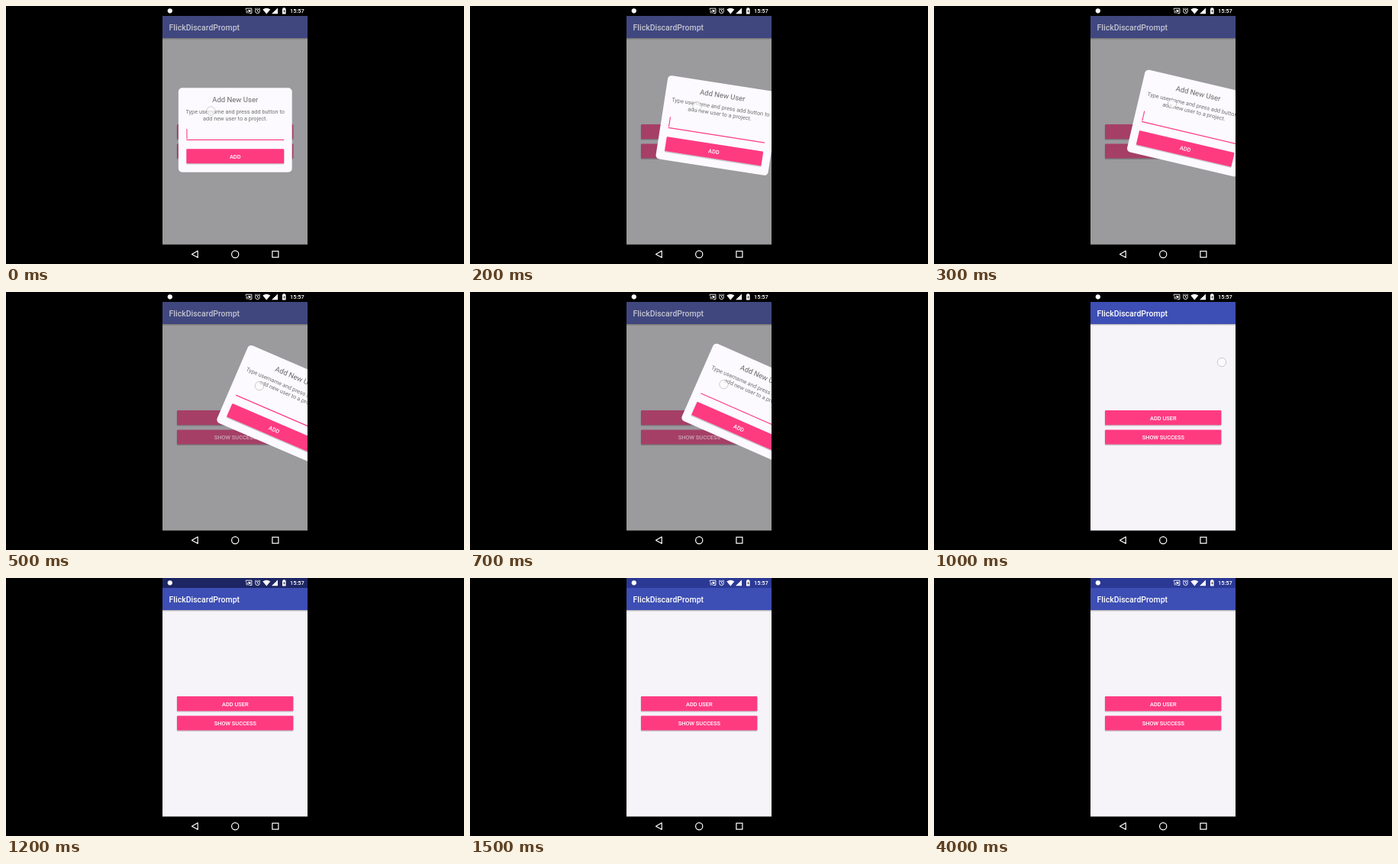
Animation, 600 px wide and 338 px high, one loop 4.1 s. Source, as an HTML page:

```html
<!DOCTYPE html>
<html lang="en">
<head>
<meta charset="utf-8">
<title>Swipe to dismiss</title>
<style>
  html, body { margin: 0; width: 100%; height: 100%; overflow: hidden; background: #000; }
  svg {
    display: block; width: 600px; height: 338px;
    font-family: Roboto, "Noto Sans", sans-serif;
    --page: #f6f4f8; --bar: #3d4eb4; --btn: #ff3b80; --label: #fff; --title: #fff;
  }
  svg.dim { --page: #9b9a9c; --bar: #40477f; --btn: #a53f65; --label: #cfaab7; --title: #c2c3cf; }
  .page { fill: var(--page); }
  .bar { fill: var(--bar); }
  .title { fill: var(--title); font-size: 10.5px; font-weight: 500; }
  .btn { fill: var(--btn); }
  .label { fill: var(--label); font-size: 7.4px; font-weight: 500; }
  .mid { text-anchor: middle; }
  .shade { fill: #000; opacity: .2; }
  .card { fill: #fcfafe; }
  .head { fill: #666; font-size: 9.5px; }
  .body { fill: #707070; font-size: 7.36px; }
  .pink { fill: #ff3b80; }
  .line { fill: none; stroke: #fff; }
  .finger { fill: #fff; fill-opacity: .6; stroke: #999; stroke-opacity: .55; stroke-width: .9; }
</style>
</head>
<body>
<svg id="stage" class="dim" viewBox="0 0 600 338">
  <defs>
    <clipPath id="screen"><rect x="205" y="13" width="190" height="299.5"/></clipPath>
    <linearGradient id="fall" x2="0" y2="1">
      <stop offset="0" stop-opacity=".28"/><stop offset="1" stop-opacity="0"/>
    </linearGradient>
  </defs>
  <rect width="600" height="338"/>
  <rect id="status" x="205" width="190" height="13"/>

  <g fill="#fff">
    <circle cx="214.8" cy="6.3" r="3.1"/>
    <g class="line" stroke-width=".9">
      <path d="M314.3 5V3.2h7.6v6.3h-3M314.3 6.2a3.3 3.3 0 0 1 3.3 3.3M314.3 8a1.5 1.5 0 0 1 1.5 1.5"/>
      <circle cx="329.5" cy="6.7" r="2.9"/>
      <path d="M329.5 4.9v2l1.3.8M325.8 4.4l1.9-1.6M333.2 4.4l-1.9-1.6"/>
    </g>
    <path d="M317 5h3.4v3h-1.8z"/>
    <path d="M336.3 4.6q5-3.8 10 0l-5 6z"/>
    <path d="M348 10.3h8V2.4z"/>
    <path d="M362 3.2h1.2v-.9h2.2v.9h1.2v7.2H362z"/>
    <text x="372" y="9.1" font-size="7.4" font-weight="500">15:57</text>
  </g>
  <path d="M364.7 4.4l-1.5 2.8h1.1v2l1.4-2.7h-1z" fill="#222"/>

  <rect class="page" x="205" y="42" width="190" height="270.5"/>
  <rect class="bar" x="205" y="13" width="190" height="29"/>
  <rect x="205" y="42" width="190" height="2.4" fill="url(#fall)"/>
  <text class="title" x="213.5" y="31.7">FlickDiscardPrompt</text>

  <g class="mid">
    <rect class="shade" x="223.7" y="156" width="152.6" height="19.6" rx="1.2"/>
    <rect class="btn" x="224" y="155" width="152.4" height="19.2" rx="1"/>
    <text class="label" x="300.3" y="167.7">ADD USER</text>
    <rect class="shade" x="223.7" y="181.4" width="152.6" height="19.6" rx="1.2"/>
    <rect class="btn" x="224" y="180.4" width="152.4" height="19.2" rx="1"/>
    <text class="label" x="300.3" y="193.1">SHOW SUCCESS</text>
  </g>

  <g clip-path="url(#screen)">
    <g id="dialog" class="mid">
      <rect class="card" x="-74.3" y="-55.3" width="148.8" height="110.6" rx="5"/>
      <text class="head" y="-36.5">Add New User</text>
      <text class="body" y="-21.7">Type username and press add button to</text>
      <text class="body" y="-13">add new user to a project.</text>
      <rect id="caret" class="pink" x="-63.8" y="-1.5" width="1.1" height="13"/>
      <rect class="pink" x="-63.8" y="12.3" width="127.8" height="1.2"/>
      <rect class="shade" x="-64" y="25.6" width="128.3" height="19.5" rx="1.2"/>
      <rect class="pink" x="-63.8" y="24.7" width="127.8" height="19" rx="1"/>
      <text y="37.2" fill="#fff" font-size="7.4" font-weight="500">ADD</text>
    </g>
    <circle id="finger" class="finger" r="5.7"/>
  </g>

  <g class="line" stroke-width="1.2">
    <path d="M251.2 320.8v8.8l-7.7-4.4z" stroke-linejoin="round"/>
    <circle cx="300.2" cy="325.2" r="4.6"/>
    <rect x="348.9" y="321.2" width="8" height="8"/>
  </g>
</svg>
<script>
  const LOOP = 4100, STEP = 100, RELEASE = 1000;
  const BLUE = [43, 57, 149];
  // [time, x, y]
  const touch = [[0, 268.5, 137.5], [300, 312, 128], [500, 332, 123], [900, 333, 119], [1000, 377, 92]];
  const drag = [[0, 300.2, 162.5], [300, 337, 153.5], [500, 364.9, 148.5], [900, 367.2, 144.7]];

  const el = id => document.getElementById(id);
  const [stage, status, dialog, caret, finger] =
    ["stage", "status", "dialog", "caret", "finger"].map(el);
  const show = (node, on) => node.setAttribute("visibility", on ? "inherit" : "hidden");

  function along(path, t) {
    const i = path.findIndex(p => p[0] >= t);
    if (i < 0) return path[path.length - 1].slice(1);
    if (i === 0) return path[0].slice(1);
    const a = path[i - 1], b = path[i], k = (t - a[0]) / (b[0] - a[0]);
    return [1, 2].map(n => a[n] + (b[n] - a[n]) * k);
  }

  function draw(now) {
    const t = Math.floor((now % LOOP) / STEP) * STEP;
    const open = t < RELEASE;
    stage.classList.toggle("dim", open);
    show(dialog, open);
    show(caret, t < 450);
    show(finger, t <= RELEASE);

    const [x, y] = along(drag, t);
    dialog.setAttribute("transform", `translate(${x} ${y}) rotate(${(x - 300.2) * 0.36})`);
    finger.setAttribute("transform", `translate(${along(touch, t)})`);

    const lit = Math.min(1, Math.max(0, (t - RELEASE) / 300));
    status.setAttribute("fill", `rgb(${BLUE.map(c => Math.round(c * lit))})`);
  }

  function tick() {
    draw(performance.now());
    requestAnimationFrame(tick);
  }
  tick();
</script>
</body>
</html>
```
